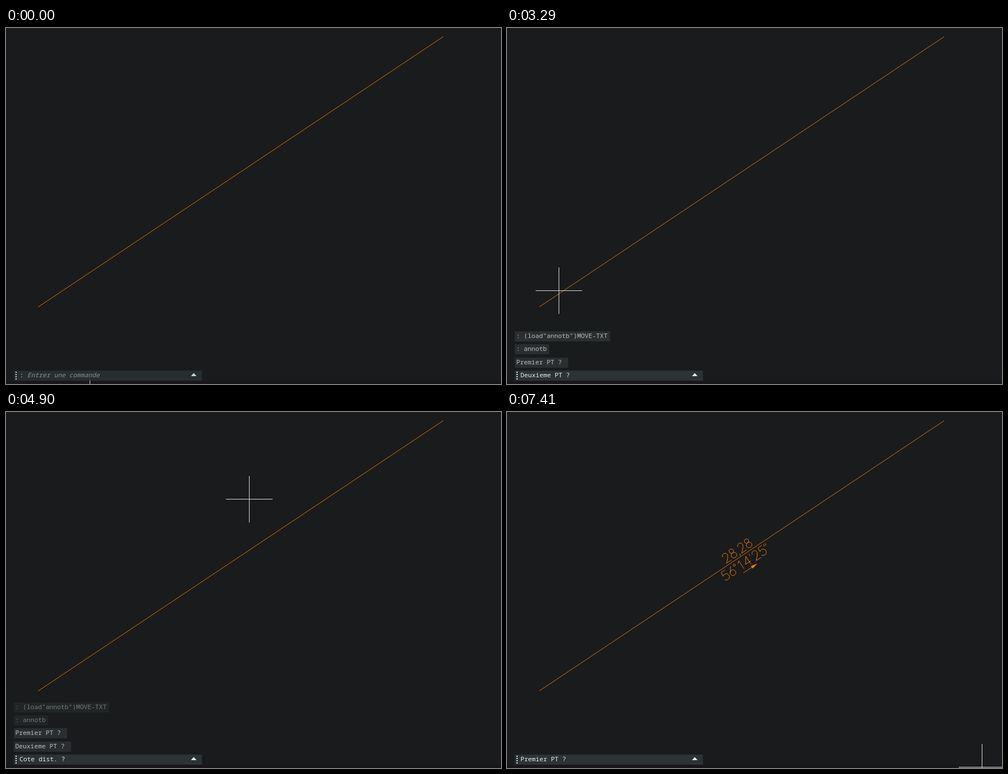
An HTML page with a canvas that plays this animation: 882 px wide and 635 px high, repeating every 7.48 s.

```html
<!DOCTYPE html>
<html lang="fr">
<head>
<meta charset="utf-8">
<title>Annotation d'une ligne</title>
<style>
  html, body { margin: 0; width: 100%; height: 100%; overflow: hidden; background: #191b1c; }
  canvas { display: block; }
</style>
</head>
<body>
<canvas id="stage" width="882" height="635"></canvas>
<script>
const ctx = document.getElementById('stage').getContext('2d');
const LOOP = 7480;
const ORANGE = '#ff7f00';
const MONO = '11.3px "Noto Sans Mono", monospace';

const DISTANCE_AT = 5190, DIRECTION_AT = 5900;
const DIM_AGE = 2300, HISTORY_TIMEOUT = 1510, MAX_ROWS = 4;

// Cursor moves: start, end, target x, target y
const home = [149, 662];
const moves = [
  [2260, 2660, 167, 513],
  [2660, 2860, 88, 470],
  [3260, 3720, 428, 279],
  [3720, 4000, 588, 160],
  [4020, 4140, 743, 50],
  [4330, 4470, 604, 139],
  [4680, 4900, 433, 155],
  [5190, 5720, 547, 285],
  [6230, 6260, 556, 307],
  [6260, 6760, 846, 633]
];

// Questions in order: time, prompt, result printed before it
const questions = [
  [1970, 'Premier PT ?'],
  [3260, 'Deuxieme PT ?'],
  [4330, 'Cote dist. ?'],
  [DISTANCE_AT, 'Cote direction ?', '28,28 - FC: NIL'],
  [DIRECTION_AT, 'Premier PT ?', '56°14\'25"']
];

// Every answered question moves into the history, followed by its result
const history = [': (load"annotb")MOVE-TXT', ': annotb'].map(text => ({ at: 2030, text }));
questions.slice(1).forEach(([at, , result], i) => {
  history.push({ at, text: questions[i][1] + ' ' });
  if (result) history.push({ at, text: result });
});

// Single-stroke glyphs, centred on x, baseline at 0
const ring = (y, rx, ry) =>
  `M${-rx} ${y}a${rx} ${ry} 0 1 0 ${2 * rx} 0a${rx} ${ry} 0 1 0 ${-2 * rx} 0`;
const glyphs = {
  '1': 'M-2.5-13.5L1.5-17V0',
  '2': 'M-4.8-12.5C-4.8-18.6 4.6-18.5 4.6-12.7C4.6-8.5-1-4-5.2 0H5.4',
  '4': 'M2.6 0V-17L-5.5-5H5.5',
  '5': 'M4.4-17H-3.6L-4.4-9.4C-1-12.6 5.3-11 5.3-5.4C5.3 1.6-4 1.4-5.2-3',
  '6': 'M2.8-17L-4.2-7.8' + ring(-5, 5.2, 5),
  '8': ring(-13.2, 4, 3.9) + ring(-4.6, 5.2, 4.7),
  '°': ring(-15, 1.9, 1.9),
  ',': 'M.8-1.4Q1 .8-.8 2.4',
  "'": 'M.3-17L-.3-13',
  '"': 'M-1.3-17.2Q-.6-15-2.4-13.2M2-17.2Q2.7-15 .9-13.2'
};
const advance = char => /\d/.test(char) ? 13.8 : 5;

function cursorAt(t) {
  let [x, y] = home;
  for (const [start, end, toX, toY] of moves) {
    if (t < start) break;
    const u = Math.min(1, (t - start) / (end - start));
    const eased = u * u * (3 - 2 * u);
    x += (toX - x) * eased;
    y += (toY - y) * eased;
  }
  return [Math.round(x), Math.round(y)];
}

function box(x, y, w, h, color) {
  ctx.fillStyle = color;
  ctx.fillRect(x, y, w, h);
}

function label(text, x, y, color, style = '') {
  ctx.font = style + MONO;
  ctx.fillStyle = color;
  ctx.fillText(text, x, y);
}

function triangle(color, ...corners) {
  ctx.fillStyle = color;
  ctx.beginPath();
  corners.forEach(([x, y]) => ctx.lineTo(x, y));
  ctx.fill();
}

function segment(x1, y1, x2, y2) {
  ctx.beginPath();
  ctx.moveTo(x1, y1);
  ctx.lineTo(x2, y2);
  ctx.stroke();
}

function centeredText(text, baseline) {
  const chars = [...text];
  let x = -chars.reduce((sum, char) => sum + advance(char), 0) / 2;
  for (const char of chars) {
    ctx.save();
    ctx.translate(x + advance(char) / 2, baseline);
    ctx.stroke(new Path2D(glyphs[char]));
    ctx.restore();
    x += advance(char);
  }
}

function drawDrawing(t) {
  ctx.strokeStyle = ORANGE;
  ctx.lineWidth = 0.85;
  segment(57.5, 497.5, 779, 15.5);

  // Local frame: x along the line, origin near its middle
  ctx.save();
  ctx.translate(417, 257.3);
  ctx.rotate(-Math.atan2(482, 721.5));
  if (t >= DISTANCE_AT) centeredText('28,28', -4);
  if (t >= DIRECTION_AT) {
    centeredText('56°14\'25"', 21.5);
    segment(-13, 27, 6, 27);
    triangle(ORANGE, [5, 24.4], [17, 27], [5, 29.6]);
  }
  ctx.restore();
}

function drawCursor(t) {
  const [x, y] = cursorAt(t);
  box(x - 41, y, 83, 1, '#dedede');
  box(x, y - 41, 1, 83, '#dedede');
}

function drawHistory(t) {
  const rows = history.filter(row => row.at <= t).slice(-MAX_ROWS);
  if (!rows.length || t - rows.at(-1).at >= HISTORY_TIMEOUT) return;
  rows.reverse().forEach(({ at, text }, i) => {
    const top = Math.floor(588 - 23.3 * i);
    const dim = t - at >= DIM_AGE;
    ctx.font = MONO;
    box(14, top, Math.floor(ctx.measureText(text).width + 7.5), 18, dim ? '#222526' : '#2a2e30');
    label(text, 16.5, top + 12, dim ? '#777a7b' : '#bcbebe');
  });
}

function drawPrompt(t) {
  const question = questions.findLast(([at]) => t >= at);
  const color = question ? '#eceeee' : '#cfd1d1';
  box(14, 611, 335, 18, question ? 'rgba(48,53,56,.9)' : 'rgba(43,47,49,.9)');
  for (let y = 613; y < 627; y += 4) box(17, y, 2, 2, color);
  triangle(color, [329.5, 621], [334.5, 615.5], [339.5, 621]);
  if (question) {
    label(question[1], 24, 623, color);
  } else {
    label(':', 24.4, 623, color);
    label('Entrer une commande', 38, 623, '#8b8e8f', 'italic ');
  }
}

function draw(now) {
  const t = now % LOOP;
  box(0, 0, 882, 635, '#191b1c');
  box(0, 630, 882, 5, '#18161a');
  drawDrawing(t);
  drawCursor(t);
  drawHistory(t);
  drawPrompt(t);
  requestAnimationFrame(draw);
}
requestAnimationFrame(draw);
</script>
</body>
</html>
```
